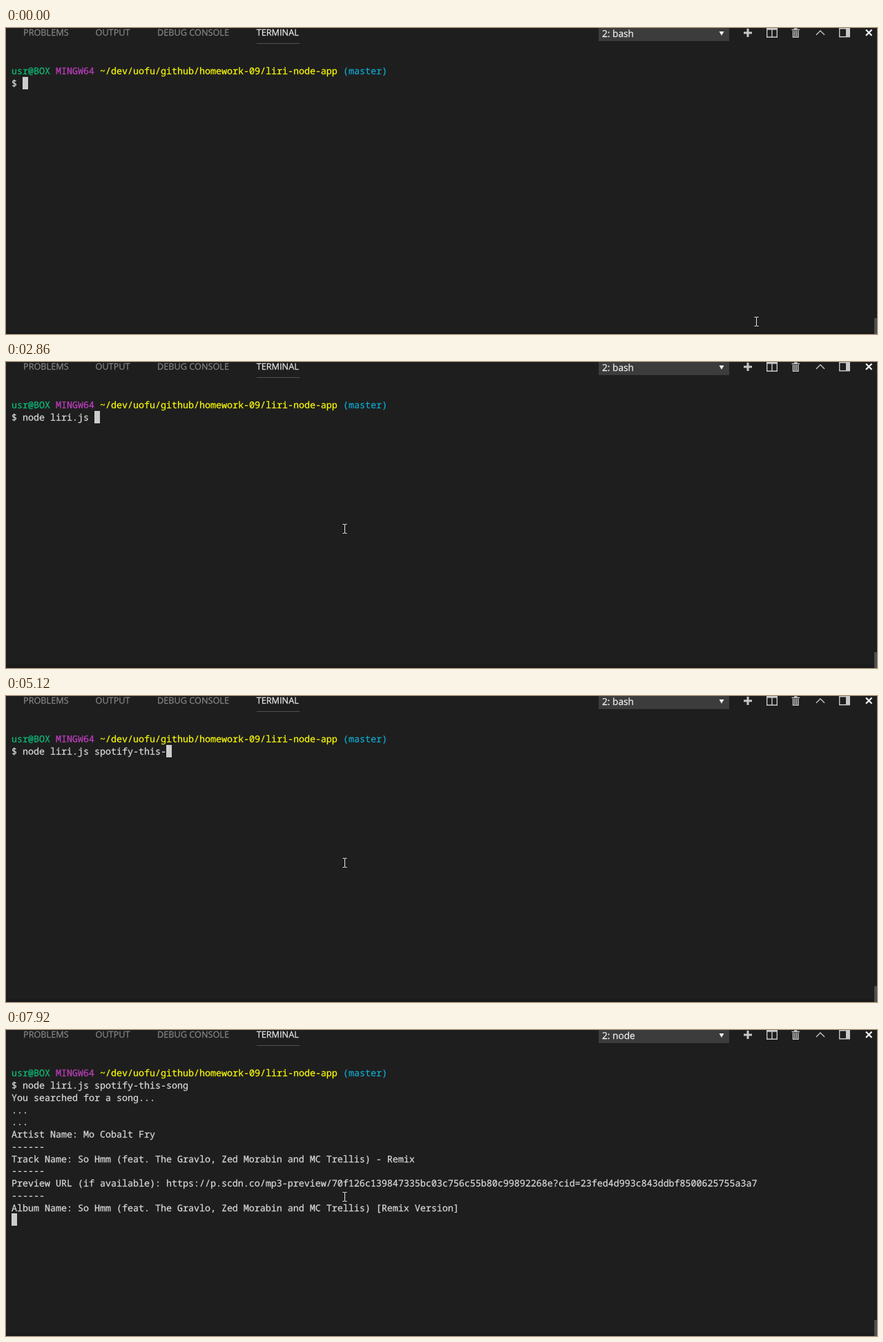
Animation, 1261 px wide and 444 px high, one loop 8000 ms. Source, as an HTML page:

```html
<!DOCTYPE html>
<html lang="en">
<head>
<meta charset="utf-8">
<title>Terminal</title>
<style>
  html, body { margin: 0; width: 100%; height: 100%; overflow: hidden; background: #1e1e1e; }
  svg { display: block; }
  text { white-space: pre; text-rendering: geometricPrecision; fill: currentColor; stroke: currentColor; stroke-width: .25px; }
  .mono { font: 13.3333px "Noto Sans Mono", "DejaVu Sans Mono", monospace; color: #d8d8d8; font-variant-ligatures: none; }
  .ui { font: 12.7px "Open Sans", "Noto Sans", sans-serif; color: #868686; }
  .icon { fill: none; stroke: #c8c8c8; stroke-width: 1.4; }
  .active { color: #e7e7e7; }
  .user { color: #0dbc79; }
  .host { color: #bc3fbc; }
  .path { color: #f8f80a; }
  .branch { color: #11a8cd; }
  #shell { font-size: 13.7px; color: #f0f0f0; }
</style>
</head>
<body>
<svg width="1261" height="444" viewBox="0 0 1261 444">
  <rect y="440" width="1261" height="4" fill="#1a1a1a"/>
  <rect x="1257" y="421" width="4" height="23" fill="#4f4f4f"/>

  <g class="ui">
    <text x="25" y="10.5">PROBLEMS</text>
    <text x="129.5" y="10.5">OUTPUT</text>
    <text x="219" y="10.5">DEBUG CONSOLE</text>
    <text x="362.7" y="10.5" class="active">TERMINAL</text>
  </g>
  <rect x="363" y="22" width="62" height="1" fill="#505050"/>

  <rect x="858" width="189" height="19" fill="#3c3c3c"/>
  <text id="shell" class="ui" x="863" y="13"></text>
  <path d="M1032.5 5h7l-3.5 6z" fill="#f0f0f0"/>

  <g class="icon">
    <path d="M1068 7h12M1074 1v12" stroke-width="3" style="stroke-width:3"/>
    <path d="M1101.7 1v12.3h14.6V1M1109 2v11M1101 .7h16M1101 2h16"/>
    <path d="M1137.5 2.5h11.5M1141 1h4.5M1139.5 4v9.2h7.5V4M1142 4v8M1144.5 4v8"/>
    <path d="M1173 10l6-6 6 6"/>
    <path d="M1206.7.7h14.6v12h-14.6z"/>
    <path d="M1218.5 1v11" style="stroke-width:5"/>
    <path d="M1245 2.5l8.5 8.5M1253.5 2.5l-8.5 8.5" style="stroke:#f0f0f0;stroke-width:2.3"/>
  </g>

  <g class="mono">
    <text x="8" y="67" class="user">usr@BOX</text>
    <text x="72" y="67" class="host">MINGW64</text>
    <text x="136" y="67" class="path">~/dev/uofu/github/homework-09/liri-node-app</text>
    <text x="488" y="67" class="branch">(master)</text>
    <text x="8" y="85">$</text>
    <text id="command" x="24" y="85"></text>
    <g id="output"></g>
  </g>
  <rect id="caret" width="8" height="18" fill="#cccccc"/>
  <path id="pointer" d="M-3-6.5h2.5l.5.5.5-.5H3M0-6V6M-3 6.5h2.5L0 6l.5.5H3" fill="none" stroke="#e8e8e8"/>
</svg>

<script>
const $ = id => document.getElementById(id);
const LOOP = 8000, ENTER = 6520, REPLY = 7920;
const COMMAND = 'node liri.js spotify-this-song';
const RULE = '------';
const SONG = 'So Hmm (feat. The Gravlo, Zed Morabin and MC Trellis)';
const REPLY_LINES = [
  'You searched for a song...', '...', '...',
  'Artist Name: Mo Cobalt Fry', RULE,
  `Track Name: ${SONG} - Remix`, RULE,
  'Preview URL (if available): https://p.scdn.co/mp3-preview/70f126c139847335bc03c756c55b80c99892268e?cid=23fed4d993c843ddbf8500625755a3a7', RULE,
  `Album Name: ${SONG} [Remix Version]`
];

// Typing pace between a few moments: [time, characters typed]
const PACE = [[0, 0], [2080, 1], [2550, 5], [2860, 13], [3490, 14], [4030, 19], [4490, 22], [5120, 26], [5670, 30]];

const mix = (a, b, k) => a + (b - a) * k;
const lineTop = row => Math.round(53.3 + 17.75 * row);

function typedAt(t) {
  const next = PACE.findIndex(([time]) => time > t);
  if (next < 0) return COMMAND.length;
  const [t0, n0] = PACE[next - 1], [t1, n1] = PACE[next];
  return Math.floor(mix(n0, n1, (t - t0) / (t1 - t0)));
}

// The pointer slides to rest in four slowing hops.
function pointerAt(t) {
  const left = 1 - Math.min(4, Math.floor(t / 70)) / 4;
  const k = 1 - left * left;
  return [mix(1086.5, 490.5, k), mix(426, 242, k)];
}

REPLY_LINES.forEach((line, i) => {
  const text = document.createElementNS('http://www.w3.org/2000/svg', 'text');
  text.setAttribute('x', 8);
  text.setAttribute('y', lineTop(i + 2) + 14);
  text.textContent = line;
  $('output').append(text);
});

function draw(t) {
  const typed = typedAt(t);
  const entered = t >= ENTER, replied = t >= REPLY;
  const row = replied ? REPLY_LINES.length + 2 : entered ? 2 : 1;
  $('command').textContent = COMMAND.slice(0, typed);
  $('shell').textContent = entered ? '2: node' : '2: bash';
  $('output').setAttribute('visibility', replied ? 'visible' : 'hidden');
  $('caret').setAttribute('x', entered ? 8 : 24 + 8 * typed);
  $('caret').setAttribute('y', lineTop(row));
  $('pointer').setAttribute('transform', `translate(${pointerAt(t)})`);
}

const start = performance.now();
function frame() {
  draw((performance.now() - start) % LOOP);
  requestAnimationFrame(frame);
}
frame();
</script>
</body>
</html>
```
